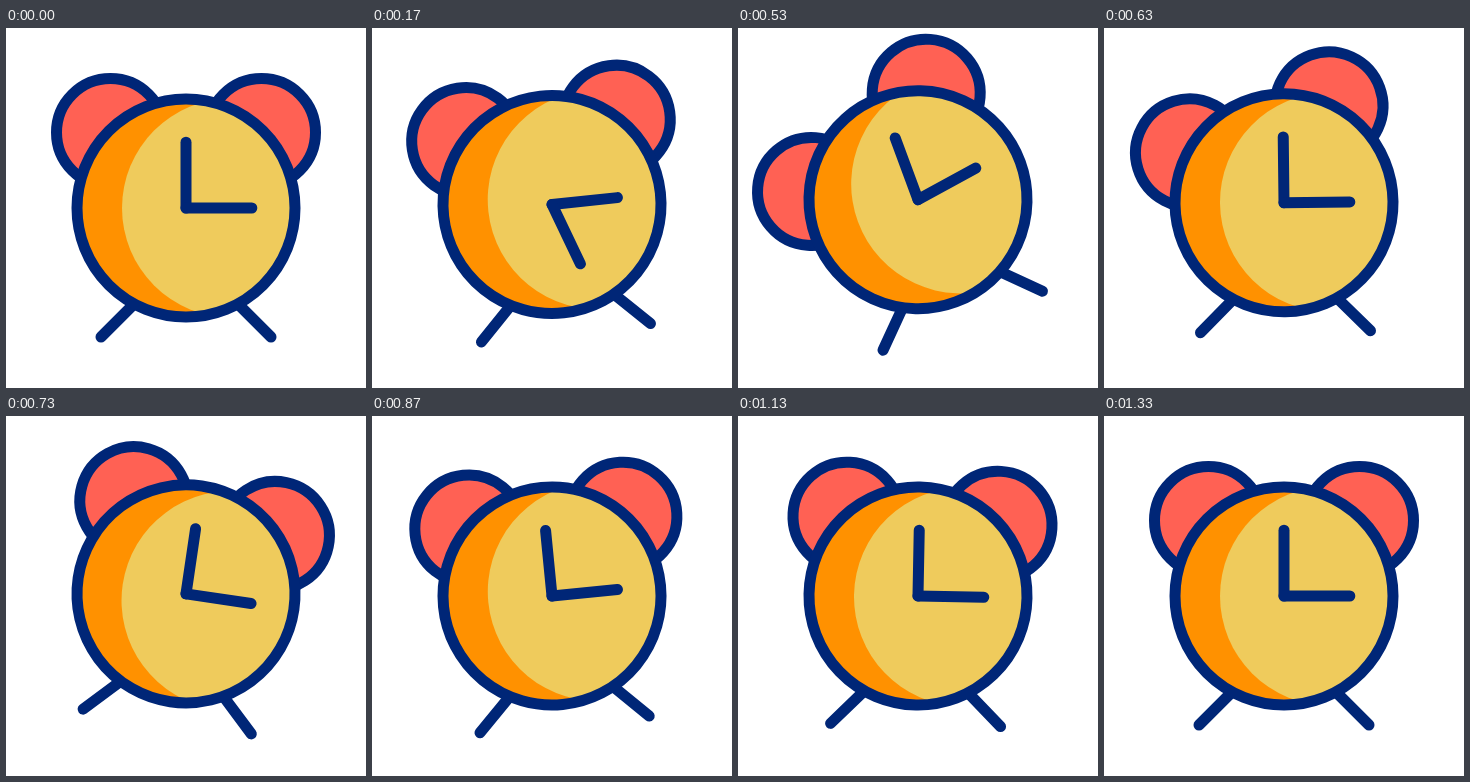
These frames come from a looping animation (360 px wide and 360 px high, 1.67 s). An HTML page with a canvas:

```html
<!DOCTYPE html>
<html lang="en">
<head>
<meta charset="utf-8">
<title>Alarm clock</title>
<style>
  html, body { margin: 0; width: 100%; height: 100%; overflow: hidden; background: #fff; }
  canvas { display: block; width: 360px; height: 360px; }
</style>
</head>
<body>
<canvas id="stage"></canvas>
<script>
const LOOP = 1670, STEP = 1000 / 30, LAST = 40;
const NAVY = '#002677', CORAL = '#ff6154', YELLOW = '#efcb5c', ORANGE = '#ff9100';
const BELL_LAG = { left: 1.9, right: 2.5 };

// Keys are [step, value]
const TILT = [[0, 0], [13.6, -20.3], [16, -20.3], [21, 10], [26, -5.6], [31, 2.5], [36.5, 0]];
const LIFT = [[0, 0], [12.5, -10], [26, 0]];
const MINUTE = [[0, 0], [15.3, 360]];
const HOUR = [[0, 90], [17.6, 450]];

const canvas = document.getElementById('stage');
const ctx = canvas.getContext('2d');
const ratio = window.devicePixelRatio || 1;
canvas.width = canvas.height = 360 * ratio;

const smooth = t => t * t * (3 - 2 * t);

function valueAt(keys, step) {
  if (step <= keys[0][0]) return keys[0][1];
  for (let i = 1; i < keys.length; i++) {
    const [start, from] = keys[i - 1], [end, to] = keys[i];
    if (step < end) return from + (to - from) * smooth((step - start) / (end - start));
  }
  return keys[keys.length - 1][1];
}

function rotated(degrees, paint) {
  ctx.save();
  ctx.rotate(degrees * Math.PI / 180);
  paint();
  ctx.restore();
}

function disc(x, y, r, fill, outlined) {
  ctx.beginPath();
  ctx.arc(x, y, r, 0, Math.PI * 2);
  if (fill) {
    ctx.fillStyle = fill;
    ctx.fill();
  }
  if (outlined) ctx.stroke();
}

function line(x1, y1, x2, y2) {
  ctx.beginPath();
  ctx.moveTo(x1, y1);
  ctx.lineTo(x2, y2);
  ctx.stroke();
}

function face() {
  ctx.save();
  ctx.beginPath();
  ctx.arc(0, 0, 109, 0, Math.PI * 2);
  ctx.clip();
  disc(0, 0, 109, ORANGE);
  disc(45.5, 0, 109.5, YELLOW);
  ctx.restore();
  disc(0, 0, 109, null, true);
}

function draw(step) {
  ctx.setTransform(ratio, 0, 0, ratio, 0, 0);
  ctx.fillStyle = '#fff';
  ctx.fillRect(0, 0, 360, 360);
  ctx.strokeStyle = NAVY;
  ctx.lineWidth = 11;
  ctx.lineCap = 'round';
  ctx.translate(180, 180 + valueAt(LIFT, step));

  rotated(valueAt(TILT, step), () => {
    rotated(valueAt(TILT, step - BELL_LAG.left), () => disc(-75.5, -75.5, 54, CORAL, true));
    rotated(valueAt(TILT, step - BELL_LAG.right), () => disc(75.5, -75.5, 54, CORAL, true));
    for (const side of [-1, 1]) line(side * 50, 94, side * 85, 129);
    face();
    for (const hand of [MINUTE, HOUR]) {
      rotated(valueAt(hand, step), () => line(0, 0, 0, -65.8));
    }
  });
}

function tick() {
  const time = performance.now() % LOOP;
  draw(Math.min(LAST, Math.floor((time + 3.4) / STEP)));
  requestAnimationFrame(tick);
}
tick();
</script>
</body>
</html>
```
